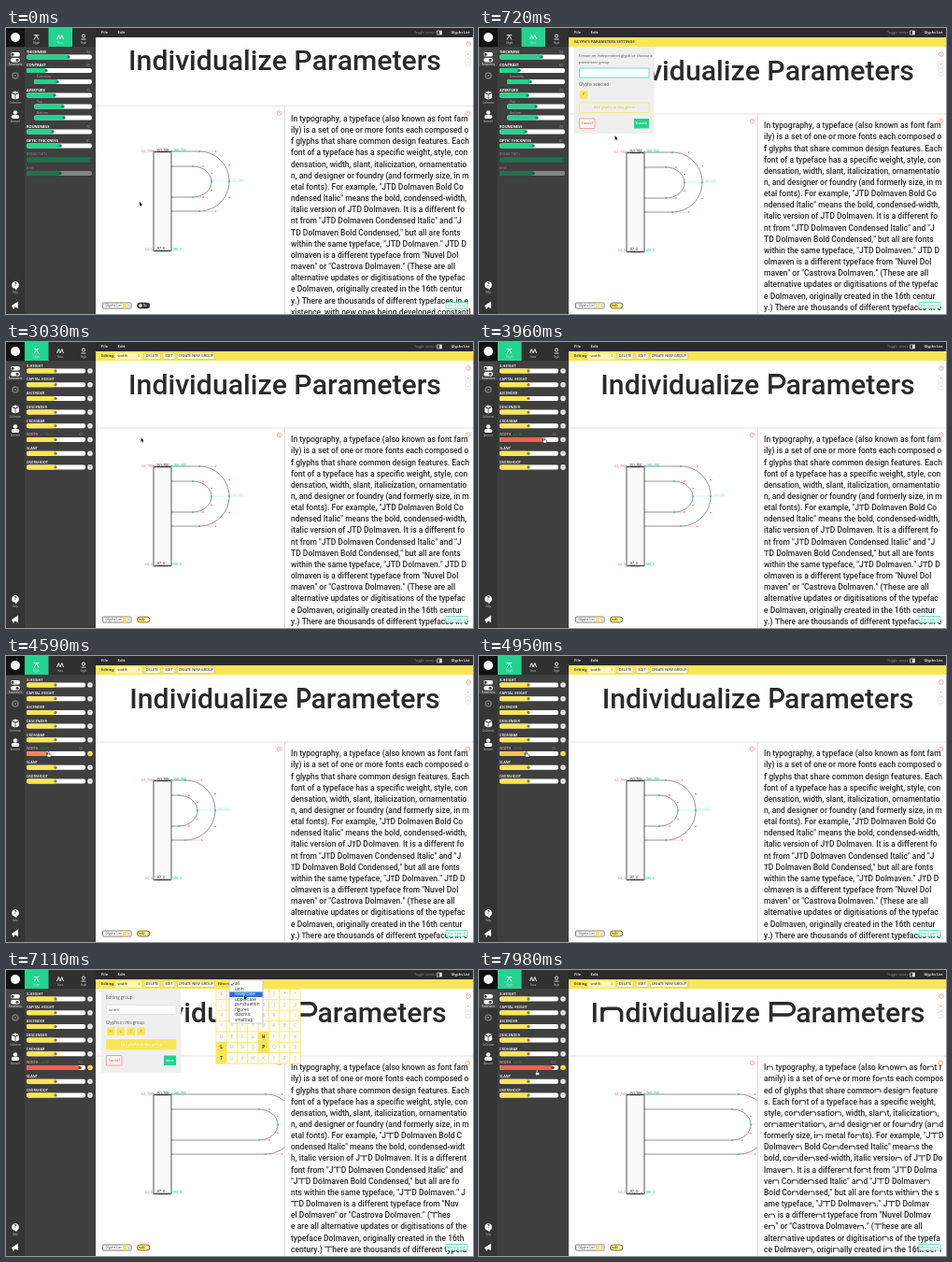
Recreate the animation shown at these times as an HTML page with a canvas. Size 500 by 306 pixels, loop 8 s.

```html
<!DOCTYPE html>
<html lang="en">
<head>
<meta charset="utf-8">
<title>Individualize Parameters</title>
<style>
html, body { margin: 0; width: 100%; height: 100%; overflow: hidden; background: #fff; }
canvas { display: block; width: 500px; height: 306px; }
</style>
</head>
<body>
<canvas id="stage"></canvas>
<script>
const W = 500, H = 306, LOOP = 8000;
const canvas = document.getElementById('stage');
const ctx = canvas.getContext('2d');
const dpr = window.devicePixelRatio || 1;
canvas.width = W * dpr;
canvas.height = H * dpr;

const GREEN = '#24d390', YELLOW = '#f9e656', RED = '#f4645a', TEAL = '#2fcfae', INK = '#2a2a2a';
const SANS = 'Roboto, sans-serif', UI = '"Open Sans", sans-serif';

// Line breaks per state: | default, ^ wide capitals, ~ wide n
const COPY = 'In typography, a typeface (also known as font f~am|^ily) is a set of one or more fonts each compos~ed o|^f glyphs that share common design feature~s. Each |^font of a typeface has a specific weight, ~style, con|^densation, width, slant, italicization, ~ornamentatio|^n, and designer or foundry (and ~formerly size, in m|^etal fonts). For example, "JTD ~Dolmaven Bold C^o|ndensed Italic" means the ~bold, condensed-widt^h, |italic version of JTD Do~lmaven. It is a different ^fo|nt from "JTD Dolma~ven Condensed Italic" and ^"J|TD Dolmaven ~Bold Condensed," but all are fo^nts |within the s~ame typeface, "JTD Dolmaven." J^TD D|olmav~en is a different typeface from "Nuv^el Dol|mav~en" or "Castrova Dolmaven." (Thes^e are all |~alternative updates or digitisations of the ^typefa~c|e Dolmaven, originally created in the 16th ^cen~tur|y.) There are thousands of different typefa^ces in ~e|xistence, with new ones being developed constantl^|~y.';
const linesFor = mark => COPY.split(mark).map(s => s.replace(/[|^~]/g, ''));
const COPY_LINES = { '|': linesFor('|'), '^': linesFor('^'), '~': linesFor('~') };

// [time, x, y]
const CURSOR = [
  [0, 143, 186], [60, 143, 186], [430, 147, 297], [530, 147, 297], [820, 145, 48], [1350, 145, 48],
  [1690, 134, 84], [1860, 134, 84], [2100, 276, 71], [2150, 276, 71], [2350, 231, 82], [2390, 231, 82],
  [2500, 231, 94], [2560, 231, 94], [2800, 174, 102], [2880, 174, 102], [3350, 53, 104], [3600, 53, 104]
];
const CURSOR_AFTER_DRAG = [
  [5520, 80, 105], [5620, 80, 105], [5950, 174, 15], [6040, 174, 15], [6350, 144, 80], [6440, 144, 80],
  [6740, 255, 15], [6840, 255, 15], [7030, 255, 27], [7160, 255, 27], [7340, 287, 38], [7390, 287, 38],
  [7610, 175, 97], [7660, 175, 97], [7960, 62, 109]
];
const KNOB = [[3600, 53], [3960, 69], [4150, 72], [4500, 44], [4950, 50], [5520, 79]];
const STRETCH = [[3700, 0], [3960, 9], [4150, 40], [4500, -16], [4950, -7], [5520, 71]];

const within = (t, a, b) => t >= a && t < b;

function track(keys, t, i = 1) {
  if (t <= keys[0][0]) return keys[0][i];
  for (let k = 1; k < keys.length; k++) {
    const a = keys[k - 1], b = keys[k];
    if (t < b[0]) {
      const u = (t - a[0]) / (b[0] - a[0]);
      return a[i] + (b[i] - a[i]) * u * u * (3 - 2 * u);
    }
  }
  return keys[keys.length - 1][i];
}

function rect(x, y, w, h, color) {
  ctx.fillStyle = color;
  ctx.fillRect(x, y, w, h);
}

function box(x, y, w, h, fill, stroke, r = 0.6, lw = 0.7) {
  ctx.beginPath();
  ctx.roundRect(x, y, w, h, r);
  if (fill) { ctx.fillStyle = fill; ctx.fill(); }
  if (stroke) { ctx.strokeStyle = stroke; ctx.lineWidth = lw; ctx.stroke(); }
}

function dot(x, y, r, fill, stroke, lw = 0.6) {
  ctx.beginPath();
  ctx.arc(x, y, r, 0, 7);
  if (fill) { ctx.fillStyle = fill; ctx.fill(); }
  if (stroke) { ctx.strokeStyle = stroke; ctx.lineWidth = lw; ctx.stroke(); }
}

function trace(points) {
  ctx.beginPath();
  points.forEach(p => ctx.lineTo(...p));
}

function line(points, color, lw = 0.7) {
  trace(points);
  ctx.strokeStyle = color;
  ctx.lineWidth = lw;
  ctx.stroke();
}

function shape(points, color) {
  trace(points);
  ctx.fillStyle = color;
  ctx.fill();
}

function label(s, x, y, size, color, { weight = 400, align = 'left', family = UI } = {}) {
  ctx.font = `${weight} ${size}px ${family}`;
  ctx.fillStyle = color;
  ctx.textAlign = align;
  ctx.textBaseline = 'middle';
  ctx.fillText(s, x, y);
}

// Letter skeletons in em units, e is the added width
const SKELETONS = {
  P(e) {
    const r = 0.2, right = 0.58 + e;
    ctx.moveTo(0.14, 0); ctx.lineTo(0.14, -0.655); ctx.lineTo(right - r, -0.655);
    ctx.arc(right - r, -0.455, r, -Math.PI / 2, Math.PI / 2);
    ctx.lineTo(0.14, -0.255);
  },
  T(e) {
    ctx.moveTo(0.02, -0.655); ctx.lineTo(0.59 + e, -0.655);
    ctx.moveTo(0.305 + e / 2, -0.655); ctx.lineTo(0.305 + e / 2, 0);
  },
  n(e) {
    const r = 0.17, right = 0.43 + e;
    ctx.moveTo(0.125, 0); ctx.lineTo(0.125, -0.528);
    ctx.moveTo(0.125, -0.3);
    ctx.quadraticCurveTo(0.14, -0.475, 0.3, -0.475);
    ctx.lineTo(right - r, -0.475);
    ctx.arc(right - r, -0.475 + r, r, -Math.PI / 2, 0);
    ctx.lineTo(right, 0);
  }
};

function runs(s, wide) {
  return wide ? s.split(new RegExp(`([${wide}])`)).filter(Boolean) : [s];
}

function specimen(s, x, y, size, wide, extra, centered) {
  ctx.font = `500 ${size}px ${SANS}`;
  ctx.fontKerning = 'none';
  ctx.textAlign = 'left';
  ctx.textBaseline = 'alphabetic';
  ctx.fillStyle = ctx.strokeStyle = INK;
  const parts = runs(s, wide).map(p => {
    const special = wide.includes(p);
    return { p, special, w: ctx.measureText(p).width + (special ? extra * size : 0) };
  });
  if (centered) x -= parts.reduce((sum, q) => sum + q.w, 0) / 2;
  for (const { p, special, w } of parts) {
    if (special) {
      ctx.save();
      ctx.translate(x, y);
      ctx.scale(size, size);
      ctx.lineWidth = 0.115;
      ctx.beginPath();
      SKELETONS[p](extra);
      ctx.stroke();
      ctx.restore();
    } else ctx.fillText(p, x, y);
    x += w;
  }
  ctx.fontKerning = 'auto';
}

function drawText(s) {
  const extra = 0.38 * s.stretch / 71;
  const caps = Math.abs(extra) > 0.015 ? 'PT' : '';
  const wide = caps && s.wideN ? 'PTn' : caps;
  specimen('Individualize Parameters', 298.5, s.bar ? 55.6 : 44.6, 30.2, wide, extra, true);

  const mark = s.wideN ? '~' : extra > 0.16 ? '^' : '|';
  const top = s.bar ? 107.2 : 100;
  COPY_LINES[mark].slice(0, 18).forEach((row, i) =>
    specimen(row, 305, top + i * 12.16, 8.5, wide, extra, false));
}

function drawGlyph(s) {
  const d = s.stretch, y = s.bar ? 1 : 0;
  ctx.save();
  ctx.beginPath();
  ctx.rect(96, 84, 202, 222);
  ctx.clip();
  ctx.translate(0, y);

  const bowl = (top, bottom, straight, right) => {
    const mid = (top + bottom) / 2, k = 0.55;
    ctx.beginPath();
    ctx.moveTo(177, top);
    ctx.lineTo(straight, top);
    ctx.bezierCurveTo(straight + (right - straight) * k, top, right, mid - (mid - top) * k, right, mid);
    ctx.bezierCurveTo(right, mid + (bottom - mid) * k, straight + (right - straight) * k, bottom, straight, bottom);
    ctx.lineTo(177, bottom);
    ctx.strokeStyle = '#777';
    ctx.lineWidth = 0.8;
    ctx.stroke();
    for (const ey of [top, bottom]) {
      const hx = straight + (right - straight) * k;
      line([[straight, ey], [hx, ey]], '#f0a09a', 0.5);
      dot(hx, ey, 0.8, RED);
      dot(straight, ey, 1, TEAL);
      dot(177, ey, 1.1, TEAL);
    }
    for (const side of [-1, 1]) dot(right, mid + side * (mid - top) * k, 0.8, RED);
    dot(right, mid, 1.1, TEAL);
  };
  bowl(132, 196, 207 + d, 239 + d);
  bowl(148, 181, 200 + d, 220 + d);
  line([[220 + d, 164], [256 + d, 164]], 'rgba(47,207,174,.35)', 0.5);
  label('192.500', 241 + d, 163, 3.5, '#8ce3d0');

  box(158, 132.5, 19, 106, '#fbfbfb', '#555', 0, 1);
  line([[158, 132.5], [177, 132.5]], '#333', 1.4);
  line([[158, 238.5], [177, 238.5]], '#333', 1.4);
  for (const [px, py] of [[158, 132], [177, 132], [158, 238], [177, 238]]) {
    dot(px, py, 1.1, TEAL);
    dot(px + (px < 165 ? 3 : -3), py, 0.8, RED);
  }
  label('64, 700', 145, 132, 3.6, RED);
  label('151.700', 161, 131.5, 3.6, '#444', { weight: 600 });
  label('180, 700', 179, 131.5, 3.6, TEAL, { weight: 600 });
  label('64, 0', 149, 237, 3.6, RED);
  label('87, 0', 162, 236.5, 3.6, '#444', { weight: 600 });
  label('180, 0', 178, 237, 3.6, TEAL, { weight: 600 });
  ctx.restore();
}

function drawWorkspace(s) {
  rect(96, 0, 404, 306, '#fff');
  const split = s.bar ? 92 : 83.5;
  line([[96, split], [500, split]], '#dcdcdc', 0.8);
  line([[298.5, split], [298.5, 306]], '#d5d5d5', 0.8);
  drawGlyph(s);
  drawText(s);

  const dy = s.bar ? 11 : 0;
  for (const [x, y] of [[495, 17 + dy], [292.5, split + 7.5], [494.5, split + 7.5]]) {
    dot(x, y, 2.3, '#fff', '#e0806c');
    line([[x, y - 1.2], [x, y], [x + 1, y]], '#e0806c', 0.5);
  }
  ['+', '–'].forEach((c, i) => {
    box(492, 25 + dy + i * 8, 5, 7, '#fff', '#ddd');
    label(c, 494.5, 28.5 + dy + i * 8, 4.5, '#999', { align: 'center' });
  });
  box(471, 293.5, 23, 6.5, 'rgba(255,255,255,.85)', TEAL);
  label('Word panel', 482.5, 296.7, 3.7, TEAL, { align: 'center' });

  box(103.5, 294, 30.5, 6, '#fff', '#444', 1);
  label('Glyphs List', 106.5, 297, 3.4, '#333');
  rect(125, 294.4, 4, 5.2, YELLOW);
  rect(129.6, 294.4, 4, 5.2, '#ddd');
  box(140.5, 294, 13.5, 6, s.pill ? YELLOW : '#333', '#444', 3);
  dot(s.pill ? 150.5 : 144, 297, 1.8, '#fff');
  label(s.pill ? 'Indiv' : 'No', s.pill ? 142 : 147, 297, 3, s.pill ? '#333' : '#fff');
}

function drawTopBar() {
  rect(96, 0, 404, 10, '#2b2b2b');
  label('File', 102, 5, 4.3, '#fff', { weight: 600 });
  label('Edit', 119.5, 5, 4.3, '#fff', { weight: 600 });
  label('Toggle views:', 437, 5, 3.8, '#8b8b8b');
  box(461.5, 3, 5, 4, null, '#ddd', 0);
  rect(464, 3, 2.5, 4, '#ddd');
  label('Glyphs List', 476.5, 5, 3.8, '#fff', { weight: 600 });
}

function slider(x, right, y, knob, fill, knobColor, rail = '#fff') {
  box(x, y - 2.5, right - x, 5, rail, null, 2);
  box(x, y - 2.5, knob - x, 5, fill, null, 2);
  dot(knob, y, 1.7, knobColor);
}

function drawGlobalSliders() {
  // [name, bar y, knob, indented]
  const rows = [
    ['THICKNESS', 31, 67], ['CONTRAST', 45.5, 43], ['Extremity', 57.5, 55, 1], ['APERTURE', 72, 52],
    ['Top', 84, 61, 1], ['Bottom', 96, 62, 1], ['ROUNDNESS', 111, 50], ['OPTIC THICKNESS', 126, 58]
  ];
  for (const [name, y, knob, sub] of rows) {
    const x = sub ? 30 : 22;
    label(name, sub ? 33 : x, y - 5.2, sub ? 3.4 : 3.9, sub ? '#aaa' : '#fff', { weight: sub ? 400 : 700 });
    if (!sub) label(String(Math.round(knob * 1.4)), 90, y - 5.2, 3.4, '#aaa', { align: 'right' });
    slider(x, 92, y, knob, GREEN, '#0c8a5c');
  }
  label('BREAK PATH', 22, 135, 3.7, '#777', { weight: 600 });
  slider(22, 92, 141, 91, '#236f50', '#1b5a41', '#236f50');
  label('AXIS', 22, 150, 3.7, '#777', { weight: 600 });
  slider(22, 92, 155.5, 58, '#236f50', '#1b5a41', '#858585');
}

function mix(a, b, u) {
  return `rgb(${a.map((v, i) => Math.round(v + (b[i] - v) * u)).join()})`;
}

function drawGroupSliders(s) {
  const names = ['X-HEIGHT', 'CAPITAL HEIGHT', 'ASCENDER', 'DESCENDER', 'CROSSBAR', 'WIDTH', 'SLANT', 'OVERSHOOT'];
  names.forEach((name, i) => {
    const y = 31 + i * 14.7, active = name === 'WIDTH';
    label(name, 22, y - 5.2, 3.8, active ? '#e3a080' : '#fff', { weight: 600 });
    if (active) {
      label('x ' + (1 + s.stretch / 71).toFixed(2), 37, y - 5.2, 3.2, '#8a6a5c');
      label(String(Math.round(s.knob * 1.3)), 82, y - 5.2, 3.2, '#b08a7c', { align: 'right' });
    }
    const knob = active ? s.knob : 53;
    const u = Math.min(1, Math.abs(knob - 53) / 12);
    slider(22, 85, y, knob, mix([249, 230, 86], [244, 94, 82], u), mix([150, 130, 30], [150, 45, 40], u));
    dot(90, y, 2.8, active && s.changed ? YELLOW : '#ececec');
    label('×', 90, y, 4, '#555', { align: 'center' });
  });
}

function drawSidebar(s) {
  rect(0, 0, 96, 306, '#3f3f3f');
  rect(0, 0, 20, 306, '#353535');
  rect(0, 0, 20, 20, '#111');
  dot(10, 10, 5, '#fff');
  rect(20, 0, 76, 20, '#303030');
  rect(s.group ? 20 : 45.5, 0, 25.5, 20, GREEN);

  line([[29.8, 7.5], [35.2, 7.5]], '#fff', 0.8);
  line([[30, 12.5], [32.5, 8], [35, 12.5]], '#fff', 0.9);
  line([[54.5, 12], [56.3, 7.5], [58, 12], [59.8, 7.5], [61.5, 12]], '#fff', 0.9);
  dot(83, 8.5, 1.6, null, '#fff', 0.8);
  line([[80.5, 12], [85.5, 12]], '#fff', 0.8);
  ['Glyph', 'Func', 'Style'].forEach((n, i) =>
    label(n, [32.5, 58, 83][i], 16, 2.8, '#ddd', { align: 'center' }));

  rect(0, 21, 20, 20, '#454545');
  for (const [y, x] of [[28, 7], [34, 12]]) {
    box(5, y - 2, 10, 4.5, '#fff', null, 2.2);
    dot(x, y + 0.2, 1.5, '#3a3a3a');
  }
  label('Parameters', 10, 39, 2.7, '#fff', { align: 'center' });
  dot(10, 51, 3, null, '#777', 1.6);
  dot(10, 51, 1.1, '#777');
  shape([[6, 70], [9.6, 71.5], [9.6, 76.5], [6, 75]], '#fff');
  shape([[10.4, 71.5], [14, 70], [14, 75], [10.4, 76.5]], '#fff');
  shape([[6, 69], [10, 67.4], [14, 69], [10, 70.6]], '#fff');
  label('Collection', 10, 80, 2.7, '#ccc', { align: 'center' });
  dot(10, 90.5, 2.3, '#fff');
  box(5.7, 93, 8.6, 4, '#fff', null, 2);
  label('Account', 10, 100, 2.7, '#ccc', { align: 'center' });
  dot(10, 275, 3.8, '#fff');
  shape([[9, 277], [12.5, 277], [11, 280.5]], '#fff');
  label('?', 10, 275, 5.5, '#333', { weight: 700, align: 'center' });
  label('Help', 10, 283.5, 2.7, '#ccc', { align: 'center' });
  shape([[6, 297], [13, 292.5], [13, 300], [9.5, 298.5], [8, 301]], '#fff');
  s.group ? drawGroupSliders(s) : drawGlobalSliders();
}

function button(s, x, y, w, h, fill, stroke, color) {
  box(x, y, w, h, fill, stroke);
  label(s, x + w / 2, y + h / 2, 3.8, color, { weight: 600, align: 'center' });
}

function drawDialog(s) {
  const edit = s.group, dy = edit ? -5.5 : 0;
  box(102, 20, 85.5, edit ? 90 : 93, '#efefef', null, 0);
  if (edit) label('Editing group', 107, 29.5, 4.6, '#555');
  else {
    label('Create an independent glyph or choose a', 107, 29.5, 4.1, '#555');
    label('parameter group', 107, 36.5, 4.1, '#555');
  }
  box(107.5, 43 + dy, 74.5, 10, '#fff', edit ? '#ddd' : TEAL);
  label(s.typed, 110, 48 + dy, 4.3, '#555');
  label(edit ? 'Glyphs in this group' : 'Glyphs selected', 107, 61 + dy * 0.75, 4.4, '#555');
  s.chosen.split('').forEach((c, i) => {
    box(108 + i * 10.8, 67 + dy, 8.4, 8.4, YELLOW, null, 0.5);
    label(c, 112.2 + i * 10.8, 71.2 + dy, 4, '#8a7a20', { align: 'center' });
  });
  const filled = s.grid || edit;
  button('Add glyphs to this group', 107.5, 80 + dy, 74.5, 10.5,
    filled ? YELLOW : null, YELLOW, filled ? '#fffbe0' : '#e6d03c');
  button('Cancel', 107.5, 97 + dy, 16.5, 10.5, '#fbf6f5', '#e88078', RED);
  button(edit ? 'Save' : 'Create', edit ? 169 : 166, 97 + dy, edit ? 13 : 16, 10.5, GREEN, null, '#fff');
}

function drawGrid(s) {
  const first = s.lower ? 97 : 36, count = s.lower ? 26 : 56, step = 11.3;
  const rows = Math.ceil(count / 8);
  rect(224.5, 20, 91, rows * 11.4 + 0.8, YELLOW);
  for (let i = 0; i < count; i++) {
    const c = String.fromCharCode(first + i), on = s.chosen.includes(c);
    const x = 225.2 + (i % 8) * step, y = 20.6 + Math.floor(i / 8) * 11.4;
    rect(x, y, step - 0.7, 10.7, on ? YELLOW : '#fdfbee');
    label(c, x + 5.3, y + 5.4, 4.6, on ? '#333' : '#b5b5b5', { weight: on ? 700 : 400, align: 'center' });
  }
  rect(224.5, 10, 50, 10, YELLOW);
  label('Filters', 227, 15, 4.1, '#333', { weight: 600 });
  box(240, 12, 34, 6.5, '#fff', '#ccc');
  label(s.lower ? 'lowercase' : 'all', 243, 15.2, 4.2, '#333');
  if (!s.menu) return;
  box(239, 11, 36, 46, '#fff', '#bbb', 1);
  const items = ['all', 'latin', 'lowercase', 'uppercase', 'punctuation', 'figures', 'diacritic', 'smallcap'];
  const hover = Math.round((s.cursor[1] - 15.5) / 5.5);
  items.forEach((name, i) => {
    const y = 15.2 + i * 5.5;
    if (i === hover) rect(239.3, y - 2.8, 35.4, 5.6, '#2a70d8');
    label(name, 245, y, 4.7, i === hover ? '#fff' : '#222');
  });
  line([[241, 15], [242, 16.5], [244, 13.5]], hover === 0 ? '#fff' : '#222', 0.7);
}

function drawBar(s) {
  rect(96, 10, 404, 10, YELLOW);
  if (!s.group) {
    label("GLYPH'S PARAMETERS SETTINGS", 102, 15, 4.1, '#444', { weight: 700 });
    return;
  }
  label('Editing', 102, 15, 3.9, '#444', { weight: 700 });
  box(117, 11.7, 28.5, 7, '#fdf6b8', null);
  label('width', 119.5, 15, 4.2, '#333');
  label('↕', 142, 15, 4.5, '#333', { align: 'center' });
  [['DELETE', 148, 17], ['EDIT', 168, 13], ['CREATE NEW GROUP', 183.5, 40]].forEach(([n, x, w]) =>
    button(n, x, 11.8, w, 6.8, '#fffbe0', '#d9c63c', '#444'));
}

function drawCursor(s) {
  const [x, y] = s.cursor;
  ctx.save();
  ctx.translate(x, y);
  if (s.hand) {
    box(-0.7, -2, 1.5, 4.5, '#fff', '#222', 0.7, 0.5);
    box(-1.5, 0.4, 4.2, 3.2, '#fff', '#222', 1, 0.5);
  } else {
    const arrow = [[0, 0], [0, 4.4], [1, 3.5], [1.7, 5], [2.4, 4.7], [1.8, 3.2], [3.1, 3.1], [0, 0]];
    line(arrow, '#fff', 1);
    shape(arrow, '#111');
  }
  ctx.restore();
}

function stateAt(t) {
  const knob = track(KNOB, t);
  const keys = t < 5520 ? CURSOR : CURSOR_AFTER_DRAG;
  const dragging = within(t, 3600, 5520);
  let chosen = 'P';
  if (t >= 2130) chosen = 'HP';
  if (t >= 2380) chosen = 'HLP';
  if (t >= 2530) chosen = 'HLTP';
  if (t >= 7370) chosen = 'HLTPn';
  return {
    knob, chosen,
    stretch: track(STRETCH, t),
    cursor: dragging ? [knob + 0.8, 104.5] : [track(keys, t), track(keys, t, 2)],
    hand: within(t, 1600, 1900) || within(t, 3350, 5700) || t > 7860,
    pill: t >= 480,
    bar: t >= 510,
    group: t >= 2910,
    dialog: within(t, 510, 2850) || within(t, 6000, 7640),
    grid: within(t, 1860, 2700) || within(t, 6400, 7640),
    menu: within(t, 6800, 7150),
    lower: t >= 7150,
    wideN: t >= 7650,
    changed: t >= 4000,
    typed: 'width'.slice(0, Math.max(0, Math.floor((t - 850) / 95)))
  };
}

function draw(now) {
  const s = stateAt(now % LOOP);
  ctx.setTransform(dpr, 0, 0, dpr, 0, 0);
  drawWorkspace(s);
  drawSidebar(s);
  drawTopBar();
  if (s.bar) drawBar(s);
  if (s.dialog) drawDialog(s);
  if (s.grid) drawGrid(s);
  drawCursor(s);
}

const start = performance.now();
function tick() {
  draw(performance.now() - start);
  requestAnimationFrame(tick);
}
tick();
</script>
</body>
</html>
```
